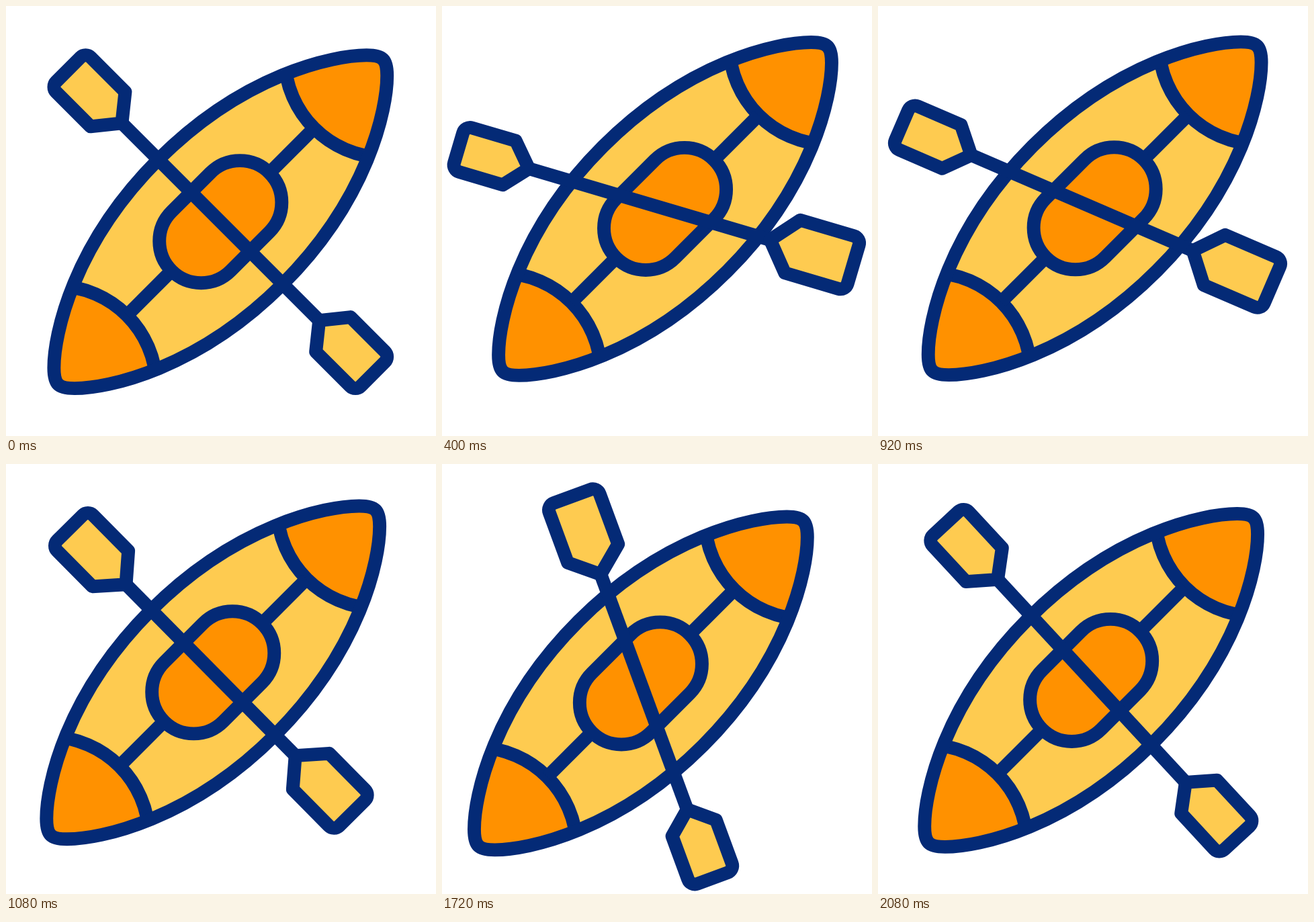
These frames come from a looping animation (640x640 px, 2120 ms). An HTML page with a canvas:

```html
<!DOCTYPE html>
<html lang="en">
<head>
<meta charset="utf-8">
<title>Kayak</title>
<style>
html, body { margin: 0; width: 100%; height: 100%; overflow: hidden; background: #fff; }
canvas { display: block; width: 640px; height: 640px; }
</style>
</head>
<body>
<canvas id="stage" width="640" height="640"></canvas>
<script>
const ctx = document.getElementById('stage').getContext('2d');
const NAVY = '#042a76', YELLOW = '#fecb50', ORANGE = '#ff9100';
const LOOP = 2120, STEP = 40, CX = 319.3, CY = 321.2;

// Blade: distance of far edge from pivot, half width, side length, length to tip
const rest = { angle: 45, x: 0, y: 0, left: [320.5, 36.5, 83.4, 112.8], right: [320.5, 36.5, 83.4, 112.8] };
const pull = { angle: 6.2, x: 15.2, y: -26.2, left: [320.5, 33.4, 77, 107.8], right: [281.8, 42.6, 98, 134.8] };
const push = { angle: 78.7, x: -31.3, y: 5.2, left: [288, 41.3, 93, 127.8], right: [305, 34.2, 78, 107.8] };

// Each leg: start, end, poses, speed at both ends, sideways bow of the boat's path
const legs = [
  { t0: 0, t1: 680, a: rest, b: pull, s0: 1.05, s1: 0, bow: [2, 0] },
  { t0: 680, t1: 1440, a: pull, b: push, s0: 0, s1: 0, bow: [-1.2, -1.6] },
  { t0: 1440, t1: LOOP, a: push, b: rest, s0: 0, s1: 1.05, bow: [-0.5, 1.8] }
];

const mix = (a, b, p) => a + (b - a) * p;

function ease(x, s0, s1) {
  const y = 1 - x;
  return s0 * x * y * y + x * x * (3 - 2 * x) - s1 * x * x * y;
}

function poseAt(t) {
  const leg = legs.find(l => t < l.t1);
  const { a, b, bow } = leg;
  const p = ease((t - leg.t0) / (leg.t1 - leg.t0), leg.s0, leg.s1);
  const arch = 4 * p * (1 - p);
  const blend = side => a[side].map((v, i) => mix(v, b[side][i], p));
  return {
    angle: mix(a.angle, b.angle, p) * Math.PI / 180,
    x: mix(a.x, b.x, p) + bow[0] * arch,
    y: mix(a.y, b.y, p) + bow[1] * arch,
    left: blend('left'),
    right: blend('right')
  };
}

function paint(fill, path) {
  ctx.beginPath();
  path();
  if (fill) {
    ctx.fillStyle = fill;
    ctx.fill();
  }
  ctx.stroke();
}

function line(x0, x1) {
  paint(null, () => {
    ctx.moveTo(x0, 0);
    ctx.lineTo(x1, 0);
  });
}

// Two equal halves: long side, blunt tip, long side back
function hull() {
  const beam = 131, reach = 180, u = 329, v = 21.6, d = 35, k = 17.3;
  ctx.moveTo(0, -beam);
  for (const s of [1, -1]) {
    const curve = (a, b, c, e, f, g) => ctx.bezierCurveTo(s * a, s * b, s * c, s * e, s * f, s * g);
    curve(reach, -beam, u - d, -v - d, u, -v);
    curve(u + k, k - v, u + k, v - k, u, v);
    curve(u - d, v + d, reach, beam, 0, beam);
  }
  ctx.closePath();
}

function boat() {
  ctx.save();
  ctx.rotate(-Math.PI / 4);
  ctx.beginPath();
  hull();
  ctx.fillStyle = YELLOW;
  ctx.fill();
  ctx.save();
  ctx.clip();
  for (const turn of [0, Math.PI]) {
    ctx.save();
    ctx.rotate(turn);
    paint(ORANGE, () => ctx.arc(347, 0, 150, 0, Math.PI * 2));
    line(100, 197);
    ctx.restore();
  }
  ctx.restore();
  paint(null, hull);
  paint(ORANGE, () => {
    ctx.arc(40.8, 0, 62.2, -Math.PI / 2, Math.PI / 2);
    ctx.arc(-40.8, 0, 62.2, Math.PI / 2, Math.PI * 1.5);
    ctx.closePath();
  });
  ctx.restore();
}

function blade([far, half, side, tip], dir) {
  const round = 11;
  ctx.save();
  ctx.scale(dir, 1);
  paint(YELLOW, () => {
    ctx.moveTo(far - tip, 0);
    ctx.lineTo(far - side, -half);
    ctx.arcTo(far, -half, far, 0, round);
    ctx.arcTo(far, half, far - side, half, round);
    ctx.lineTo(far - side, half);
    ctx.closePath();
  });
  ctx.restore();
}

function paddle({ angle, left, right }) {
  ctx.save();
  ctx.rotate(angle);
  line(left[3] - left[0], right[0] - right[3]);
  blade(left, -1);
  blade(right, 1);
  ctx.restore();
}

function draw(now) {
  const t = Math.floor((now % LOOP) / STEP) * STEP;
  const pose = poseAt(t);
  ctx.fillStyle = '#fff';
  ctx.fillRect(0, 0, 640, 640);
  ctx.strokeStyle = NAVY;
  ctx.lineWidth = 19.9;
  ctx.lineJoin = 'round';
  ctx.save();
  ctx.translate(CX + pose.x, CY + pose.y);
  boat();
  paddle(pose);
  ctx.restore();
}

let start = null;
function tick(now) {
  if (start === null) start = now;
  draw(now - start);
  requestAnimationFrame(tick);
}
draw(0);
requestAnimationFrame(tick);
</script>
</body>
</html>
```
